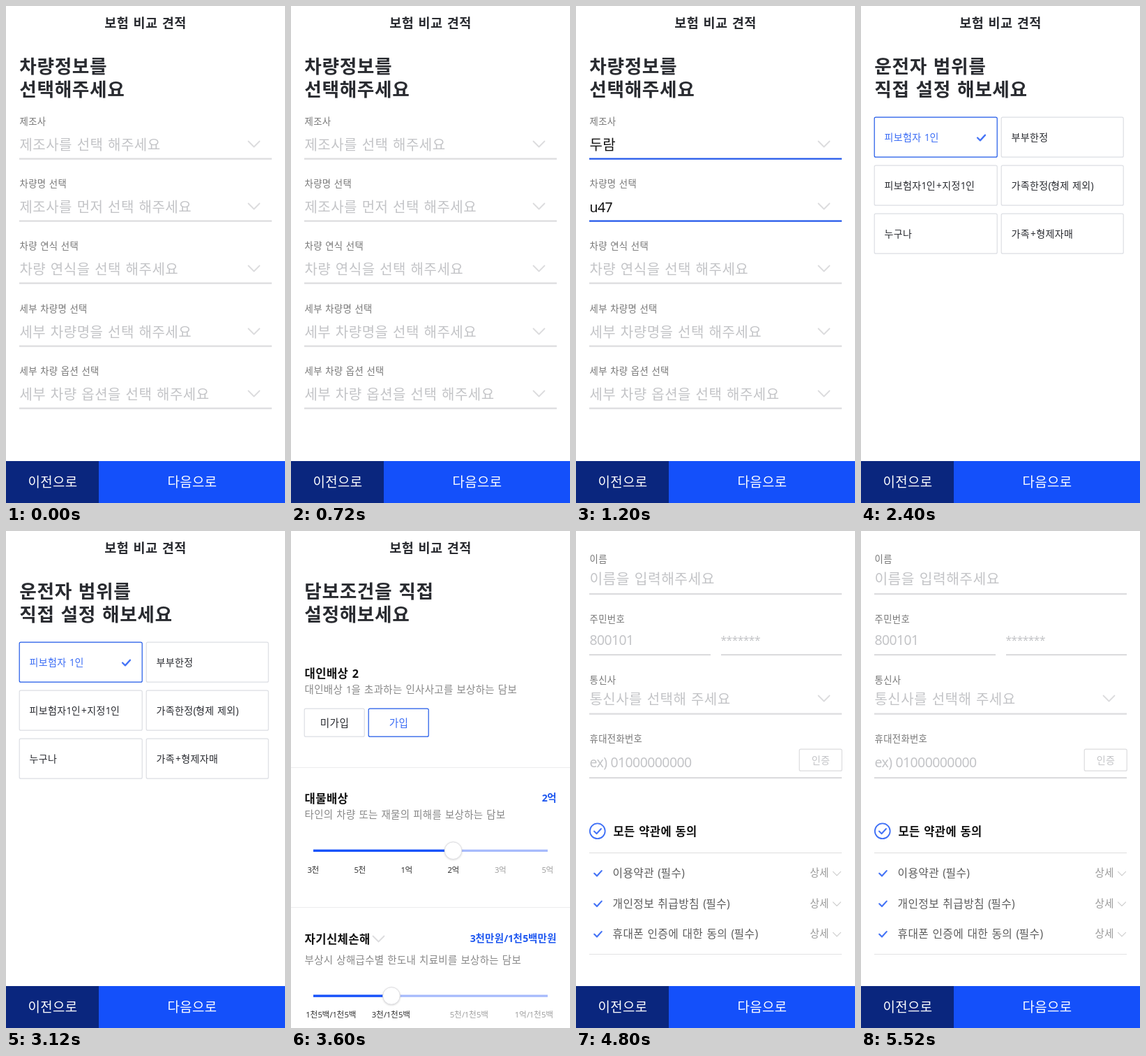
Recreate the animation shown at these times as an HTML page with a canvas. Size 400 px wide and 711 px high, loop 6 s.

```html
<!DOCTYPE html>
<html lang="ko">
<head>
<meta charset="utf-8">
<title>보험 비교 견적</title>
<style>
html, body { margin: 0; width: 100%; height: 100%; overflow: hidden; background: #fff; }
canvas { display: block; width: 100vw; height: 100vh; }
</style>
</head>
<body>
<canvas id="stage"></canvas>
<script>
const W = 400, H = 711, STEP = 1200;
const BLUE = '#1450fa', SOFT_BLUE = '#a5b9fc', NAVY = '#0a267e';
const INK = '#292b30', LABEL = '#777', HINT = '#c3c4c7', RULE = '#dcdcde', NOTE = '#888';
const canvas = document.getElementById('stage');
const ctx = canvas.getContext('2d');

// Korean and Latin runs use separate faces; size is the advance of one syllable.
function runs(str, size, weight) {
  return (str.match(/[가-힣 ]+|[^가-힣 ]+/g) || []).map(s => {
    const ko = /[가-힣 ]/.test(s);
    const run = {
      s,
      font: ko ? `${weight} ${size * 1.06}px "Noto Sans CJK KR", "Noto Sans CJK", sans-serif`
               : `${weight} ${size * 1.03}px "Noto Sans", "Open Sans", sans-serif`,
      gap: size * (ko ? 0.025 : -0.03) + 'px',
      word: size * 0.09 + 'px'
    };
    setRun(run);
    run.w = ctx.measureText(s).width;
    return run;
  });
}

function setRun(r) {
  ctx.font = r.font;
  ctx.letterSpacing = r.gap;
  ctx.wordSpacing = r.word;
}

// y is the middle of the line; align is 0 left, 0.5 centre, 1 right.
function text(str, x, y, size, color, weight = 400, align = 0) {
  const list = runs(str, size, weight);
  const total = list.reduce((sum, r) => sum + r.w, 0);
  x -= total * align + (align ? 0 : size * 0.03);
  ctx.fillStyle = color;
  for (const r of list) {
    setRun(r);
    ctx.fillText(r.s, x, y + size * 0.4);
    x += r.w;
  }
}

function rect(x, y, w, h, color) {
  ctx.fillStyle = color;
  ctx.fillRect(x, y, w, h);
}

function box(x, y, w, h, color) {
  ctx.strokeStyle = color;
  ctx.lineWidth = 1.2;
  ctx.beginPath();
  ctx.roundRect(x + 0.2, y + 0.2, w - 1, h - 1, 2);
  ctx.stroke();
}

function path(points, color, width) {
  ctx.strokeStyle = color;
  ctx.lineWidth = width;
  ctx.lineCap = ctx.lineJoin = 'round';
  ctx.beginPath();
  points.forEach(([x, y]) => ctx.lineTo(x, y));
  ctx.stroke();
}

function chevron(x, y, w = 16, color = RULE, width = 1.8) {
  path([[x - w / 2, y - w / 4], [x, y + w / 4], [x + w / 2, y - w / 4]], color, width);
}

function check(x, y, w = 10.5, width = 2.2) {
  path([[x - w / 2, y], [x - w / 7, y + w * 0.35], [x + w / 2, y - w * 0.35]], '#4473f6', width);
}

function rule(y, color = RULE, x = 19, right = 381) {
  rect(x, y - 1, right - x, 2.2, color);
}

function header(first, second) {
  text('보험 비교 견적', 200, 24, 17.5, INK, 700, 0.5);
  text(first, 20, 86, 25.2, INK, 700);
  text(second, 20, 119, 25.2, INK, 700);
}

function footer() {
  rect(0, 651, W, 60, BLUE);
  rect(0, 651, 133, 60, NAVY);
  text('이전으로', 67, 681, 17.8, '#fff', 400, 0.5);
  text('다음으로', 267, 681, 17.8, '#fff', 400, 0.5);
}

function label(str, y) {
  text(str, 20, y, 12.6, LABEL);
}

function carForm(values) {
  header('차량정보를', '선택해주세요');
  const rows = [
    ['제조사', '제조사를 선택 해주세요'],
    ['차량명 선택', '제조사를 먼저 선택 해주세요'],
    ['차량 연식 선택', '차량 연식을 선택 해주세요'],
    ['세부 차량명 선택', '세부 차량명을 선택 해주세요'],
    ['세부 차량 옵션 선택', '세부 차량 옵션을 선택 해주세요']
  ];
  rows.forEach(([name, hint], i) => {
    const y = Math.round(i * 89.2), value = values[i];
    label(name, 164.5 + y);
    text(value || hint, 20, 198 + y, 18.9, value ? '#111' : HINT);
    chevron(355.5, 197.5 + y);
    rule(218.5 + y, value ? '#1f55ea' : RULE);
  });
  footer();
}

function driverRange() {
  header('운전자 범위를', '직접 설정 해보세요');
  // Hair spaces open up the plus signs.
  const names = ['피보험자 1인', '부부한정', '피보험자1인\u200a+\u200a지정1인',
                 '가족한정(형제 제외)', '누구나', '가족\u200a+\u200a형제자매'];
  names.forEach((name, i) => {
    const x = 19 + (i % 2) * 182, y = 159 + (i >> 1) * 69;
    box(x, y, i % 2 ? 176 : 177, 58, i ? '#dcdee3' : '#1f58e8');
    text(name, x + 15, y + 29, 13.2, i ? INK : '#3a6cf5');
  });
  check(172.5, 188.5, 11, 2.3);
  footer();
}

function slider(y, knob) {
  rect(32, y - 1.5, 336, 3.2, SOFT_BLUE);
  rect(32, y - 1.5, knob - 32, 3.2, BLUE);
  ctx.save();
  ctx.shadowColor = 'rgba(0,0,0,.22)';
  ctx.shadowBlur = 3;
  ctx.shadowOffsetY = 0.7;
  ctx.fillStyle = '#fff';
  ctx.beginPath();
  ctx.arc(knob, y, 12.3, 0, Math.PI * 2);
  ctx.fill();
  ctx.restore();
  ctx.strokeStyle = '#dedee2';
  ctx.lineWidth = 1;
  ctx.stroke();
}

function ticks(names, xs, y, active) {
  names.forEach((name, i) =>
    text(name, xs[i], y, 11, i < active ? '#333' : '#a0a0a0', 400, 0.5));
}

function coverage() {
  header('담보조건을 직접', '설정해보세요');
  text('대인배상 2', 20, 204, 15.7, '#111', 700);
  text('대인배상 1을 초과하는 인사사고를 보상하는 담보', 20, 227, 13.65, NOTE);
  box(19, 254, 87, 41, '#dcdee3');
  text('미가입', 62.5, 274.5, 13.8, INK, 400, 0.5);
  box(111, 254, 87, 41, '#1f58e8');
  text('가입', 154.5, 274.5, 13.8, '#3a6cf5', 400, 0.5);

  rect(0, 338, W, 1, '#ececee');
  text('대물배상', 20, 382.5, 15.7, '#111', 700);
  text('2억', 381, 381.5, 13.7, '#1f58f0', 700, 1);
  text('타인의 차량 또는 재물의 피해를 보상하는 담보', 20, 405.5, 13.65, NOTE);
  slider(457.2, 232.5);
  ticks(['3천', '5천', '1억', '2억', '3억', '5억'], [32, 99, 166, 233, 300.5, 368], 485, 4);

  rect(0, 538, W, 1, '#ececee');
  text('자기신체손해', 20, 583.5, 15.7, '#111', 700);
  chevron(125.5, 583.5);
  text('3천만원/1천5백만원', 381, 582.5, 13.7, '#1f58f0', 700, 1);
  text('부상시 상해급수별 한도내 치료비를 보상하는 담보', 20, 613.5, 13.65, NOTE);
  slider(665, 144);
  ticks(['1천5백/1천5백', '3천/1천5백', '5천/1천5백', '1억/1천5백'],
        [57.5, 143.5, 255.5, 348.5], 692, 2);
}

function consent() {
  label('이름', 39.5);
  text('이름을 입력해주세요', 20, 68, 19.2, HINT);
  rule(90);
  label('주민번호', 126);
  text('800101', 20, 155.5, 18.8, HINT);
  text('*******', 208, 156, 15, HINT);
  rule(177, RULE, 19, 193);
  rule(177, RULE, 208, 381);
  label('통신사', 212.5);
  text('통신사를 선택해 주세요', 20, 240, 18.9, HINT);
  chevron(355.5, 239.5);
  rule(261.5);
  label('휴대전화번호', 297);
  text('ex) 01000000000', 20, 330, 18.9, HINT);
  box(320, 312, 62, 32, RULE);
  text('인증', 351, 328, 13.3, HINT, 400, 0.5);
  rule(353);

  ctx.strokeStyle = '#3f70f6';
  ctx.lineWidth = 1.8;
  ctx.beginPath();
  ctx.arc(30.8, 429.3, 10.9, 0, Math.PI * 2);
  ctx.stroke();
  check(31, 429.5, 10, 2);
  text('모든 약관에 동의', 54, 429.5, 15.6, '#111', 700);
  rect(19, 460, 362, 1, '#dedede');
  ['이용약관 (필수)', '개인정보 취급방침 (필수)', '휴대폰 인증에 대한 동의 (필수)'].forEach((name, i) => {
    const y = 489.5 + i * 43.5;
    check(31.5, y + 0.3);
    text(name, 53, y, 14.9, '#5c5c5c');
    text('상세', 335.8, y - 0.5, 13.7, '#999');
    chevron(374, y + 0.7, 11, '#ccc', 1.1);
  });
  rect(19, 605, 362, 1, '#e2e2e4');
  footer();
}

const scenes = [
  () => carForm([]),
  () => carForm(['두람', 'u47']),
  driverRange,
  coverage,
  consent
];

function draw(now) {
  const ratio = window.devicePixelRatio || 1;
  const w = Math.round(W * ratio), h = Math.round(H * ratio);
  if (canvas.width !== w || canvas.height !== h) {
    canvas.width = w;
    canvas.height = h;
  }
  ctx.setTransform(ratio, 0, 0, ratio, 0, 0);
  rect(0, 0, W, H, '#fff');
  scenes[Math.floor(Math.max(0, now - start) / STEP) % scenes.length]();
}

const start = performance.now();
function tick() {
  draw(performance.now());
  requestAnimationFrame(tick);
}
tick();
</script>
</body>
</html>
```
